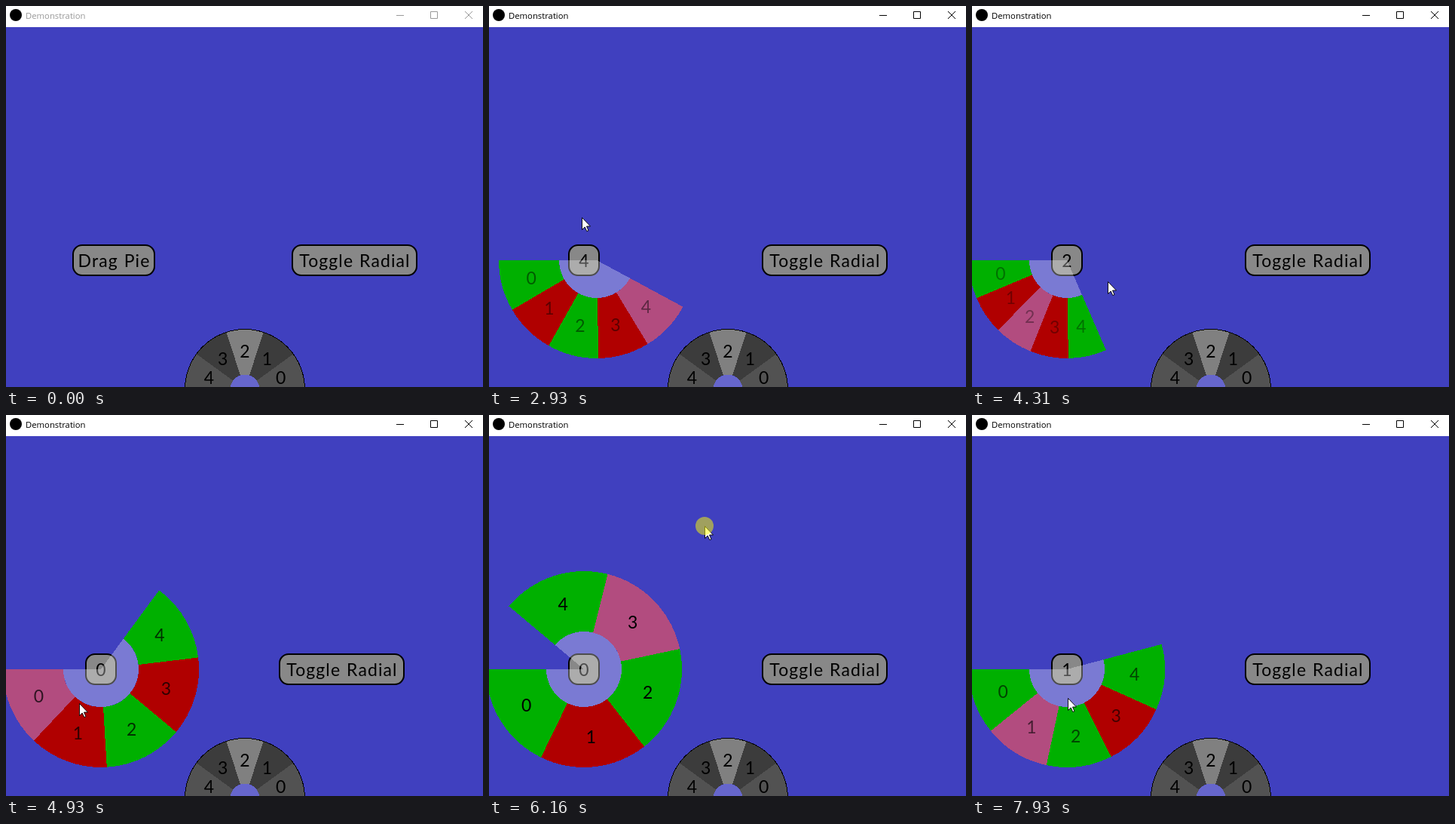
Animation of 633x505 px, one loop 8 s. Source, as an HTML page:

```html
<!DOCTYPE html>
<html lang="en">
<head>
<meta charset="utf-8">
<title>Demonstration</title>
<style>
  html, body { margin: 0; width: 100%; height: 100%; overflow: hidden; background: #4040bf; }
  svg { display: block; }
  text { font: 23px Lato, sans-serif; text-anchor: middle; }
  .label { letter-spacing: 1.1px; word-spacing: 1px; }
  .title { font: 11.3px "Open Sans", sans-serif; text-anchor: start; }
  .pie path, .rim { shape-rendering: crispEdges; }
</style>
</head>
<body>
<svg id="stage" width="633" height="505" viewBox="0 0 633 505"></svg>
<script>
const stage = document.getElementById('stage');

// All times below are in ticks, 13 per second.
const LOOP = 8000, TICKS = 104, TICK = LOOP / TICKS;
const FOLD = 2.3;                               // time a menu takes to unfold or fold
const clicks = [{ press: 6.8, release: 7.6 }, { press: 22, release: 22.57 }];

// Quick drags come at a steady pace, then one long drag circles the pie.
const HOME = [126, 338];
const goals = [[123, 280], [183, 314], [180, 365], [97, 382], [95, 380]];
const FIRST = 36.79, PACE = 8.863, HOLD = 3.6;
const drags = goals.map((_, i) => ({ press: FIRST + i * PACE - HOLD, release: FIRST + i * PACE }));
const long = { press: FIRST + goals.length * PACE - HOLD, release: 102.1 };
drags.push(long);

// Pointer stops: [tick, x, y]
const stops = [
  [1, 505, 467], [7, 445, 333], [22, 445, 334], [24, 421, 353], [28, 155, 367],
  ...goals.flatMap((goal, i) => [
    [drags[i].press, ...HOME], [drags[i].release - 1, ...goal], [drags[i].release + 2.4, ...goal]
  ]),
  [long.press, ...HOME],
  [78.5, 160, 56], [80, 286, 147], [82, 240, 440], [83.5, 60, 560], [85, 8, 300],
  [87, 130, 138], [90, 310, 260], [93, 250, 430], [96.5, 352, 350], [102, 127, 375]
];

const clamp = v => Math.max(0, Math.min(1, v));
const during = (t, { press, release }) => t >= press && t < release;
const unfolded = (t, open, close) => Math.min(clamp((t - open) / FOLD), clamp(1 - (t - close) / FOLD));

function pointer(t) {
  if (t < stops[0][0]) return null;
  const i = stops.findIndex(s => s[0] > t);
  if (i < 0) return stops[stops.length - 1].slice(1);
  const [t0, x0, y0] = stops[i - 1], [t1, x1, y1] = stops[i];
  const k = (t - t0) / (t1 - t0);
  return [Math.round(x0 + (x1 - x0) * k), Math.round(y0 + (y1 - y0) * k)];
}

const polar = (cx, cy, r, deg) => {
  const a = deg * Math.PI / 180;
  return [cx + r * Math.cos(a), cy - r * Math.sin(a)];
};
const pt = (...args) => polar(...args).map(v => v.toFixed(2)).join(' ');

function sector(cx, cy, r0, r1, a0, a1, fill) {
  const big = a1 - a0 > 180 ? 1 : 0;
  const inner = r0 ? `L${pt(cx, cy, r0, a1)}A${r0} ${r0} 0 ${big} 1 ${pt(cx, cy, r0, a0)}` : `L${cx} ${cy}`;
  return `<path fill="${fill}" d="M${pt(cx, cy, r1, a0)}A${r1} ${r1} 0 ${big} 0 ${pt(cx, cy, r1, a1)}${inner}Z"/>`;
}

function pie({ cx, cy, r0, r1, from, span, color, hub, textR, alpha = 1 }) {
  if (span <= 0) return '';
  const step = span / 5;
  let shapes = '', digits = '';
  for (let i = 0; i < 5; i++) {
    shapes += sector(cx, cy, r0, r1, from + i * step, from + (i + 1) * step, color(i));
    const [x, y] = polar(cx, cy, textR, from + (i + .5) * step);
    digits += `<text x="${x.toFixed(1)}" y="${(y + 8).toFixed(1)}" opacity="${alpha}">${i}</text>`;
  }
  return `<g class="pie">${shapes}${sector(cx, cy, 0, r0, from, from + span, hub)}${digits}</g>`;
}

function button(x, w, label, mouse) {
  const over = mouse && mouse[0] >= x && mouse[0] < x + w && mouse[1] >= 316 && mouse[1] < 358;
  return `<rect x="${x + 1}" y="317" width="${w - 2}" height="40" rx="12" stroke="#000" stroke-width="2" fill="${over ? '#dadada' : '#888'}"/>
    <text class="label" x="${x + w / 2 + .5}" y="345.5">${label}</text>`;
}

// The button shrinks after the first pick, which shifts its centre.
const centerOf = drag => drag === drags[0] ? 143 : 126;

function sliceAt([x, y], cx) {
  const turn = (Math.atan2(337 - y, x - cx) * 180 / Math.PI + 540) % 360;
  return Math.floor(turn / 64);
}
const picked = drag => sliceAt(pointer(drag.release), centerOf(drag));

function dragPie(t, mouse) {
  const drag = drags.find(d => t >= d.press && t < d.release + FOLD);
  if (!drag) return '';
  const cx = centerOf(drag), open = unfolded(t, drag.press, drag.release);
  const hot = t < drag.release ? sliceAt(mouse, cx) : picked(drag);
  return pie({ cx, cy: 337, r0: 50, r1: 130, from: 180, span: 320 * open, textR: 90, alpha: open,
    color: i => i === hot ? '#b24c7f' : i % 2 ? '#b00000' : '#00b000', hub: 'rgba(255,255,255,.3)' });
}

function radial(t) {
  const open = unfolded(t, clicks[0].release, clicks[1].release);
  return pie({ cx: 462, cy: 301, r0: 50, r1: 100, from: 0, span: 180 * open, textR: 75, alpha: open,
    color: i => i % 2 ? '#960000' : '#646464', hub: 'rgba(255,255,255,.5)' });
}

const dial = pie({ cx: 317, cy: 508, r0: 19.5, r1: 79.5, from: 0, span: 180, textR: 50,
  color: i => i === 2 ? '#808080' : i % 2 ? '#3c3c3c' : '#525252', hub: '#6666cc' }) +
  '<circle class="rim" cx="317" cy="508" r="79.5" fill="none" stroke="#000"/>';

function titleBar(active) {
  const ink = active ? '#000' : '#999';
  return `<rect width="633" height="28" fill="#fff"/><circle cx="13" cy="12" r="8" fill="#000"/>
    <text class="title" x="26" y="17" fill="${ink}">Demonstration</text>
    <path d="M518 12.5h10M563.5 7.5h9v9h-9zM609 7l10 10M619 7l-10 10" fill="none" stroke="${ink}"/>`;
}

function cursor(mouse, pressed) {
  if (!mouse) return '';
  const [x, y] = mouse;
  return `<path transform="translate(${x} ${y})" d="M.5 .5V16.5L4.2 13L6.8 18.6L9 17.6L6.5 12H11.5Z" fill="#fff" stroke="#000" stroke-width=".9"/>` +
    (pressed ? `<circle cx="${x}" cy="${y}" r="12" fill="#ff0" opacity=".5"/>` : '');
}

function draw(t) {
  const mouse = pointer(t);
  const last = drags.filter(d => t >= d.release).pop();
  const pressed = [...clicks, ...drags].some(p => during(t, p));
  const buttons = last
    ? button(105, 42, picked(last), mouse) + button(362, 167, 'Toggle Radial', mouse)
    : button(88, 110, 'Drag Pie', mouse) + button(379, 167, 'Toggle Radial', mouse);
  stage.innerHTML = '<rect width="633" height="505" fill="#4040bf"/>' + buttons + dial + radial(t) +
    dragPie(t, mouse) + titleBar(t >= clicks[0].press) + cursor(mouse, pressed);
}

let shown = -1;
function frame() {
  const tick = Math.min(TICKS - 1, Math.floor((performance.now() % LOOP + 20) / TICK));
  if (tick !== shown) draw(shown = tick);
  requestAnimationFrame(frame);
}
frame();
</script>
</body>
</html>
```
